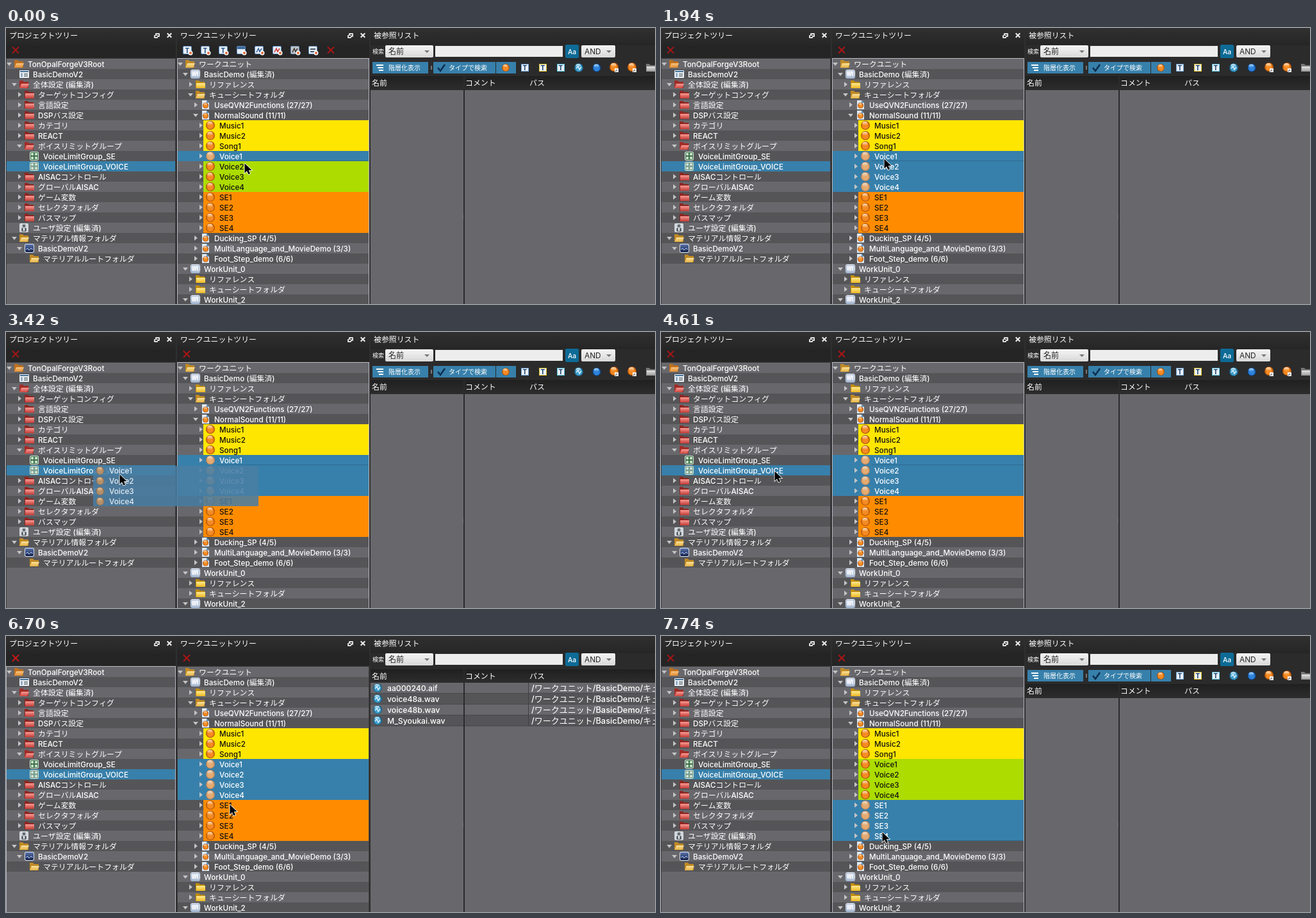
Write an HTML page with a canvas that moves like this. It is 1013 px wide and 431 px high and loops after 8 s.

```html
<!DOCTYPE html>
<html lang="ja">
<head>
<meta charset="utf-8">
<style>
html, body { margin: 0; width: 100%; height: 100%; overflow: hidden; background: #2b2b2c; }
canvas { display: block; }
</style>
</head>
<body>
<canvas id="stage" width="1013" height="431"></canvas>
<script>
const c = document.getElementById('stage').getContext('2d');
const BLUE = '#3780ab', ROW = '#68686c', ALT = '#555558', BAR = '#2b2b2c';
const YELLOW = '#ffe600', GREEN = '#addc00', ORANGE = '#ff8c00';
const LOOP = 8000;

// depth, icon, label, arrow (v open, > closed)
const project = [
  [0, 'root', 'TonOpalForgeV3Root', 'v'], [1, 'list', 'BasicDemoV2'],
  [1, 'redOpen', '全体設定 (編集済)', 'v'],
  ...['ターゲットコンフィグ', '言語設定', 'DSPバス設定', 'カテゴリ', 'REACT'].map(s => [2, 'red', s, '>']),
  [2, 'redOpen', 'ボイスリミットグループ', 'v'],
  [3, 'group', 'VoiceLimitGroup_SE'], [3, 'group', 'VoiceLimitGroup_VOICE'],
  ...['AISACコントロール', 'グローバルAISAC', 'ゲーム変数', 'セレクタフォルダ', 'バスマップ'].map(s => [2, 'red', s, '>']),
  [1, 'user', 'ユーザ設定 (編集済)'], [1, 'open', 'マテリアル情報フォルダ', 'v'],
  [2, 'wave', 'BasicDemoV2', 'v'], [3, 'open', 'マテリアルルートフォルダ']
];
const cue = (name, color) => [4, 'ball', name, '>', color];
const work = [
  [0, 'open', 'ワークユニット', 'v'], [1, 'unit', 'BasicDemo (編集済)', 'v'],
  [2, 'folder', 'リファレンス', '>'], [2, 'open', 'キューシートフォルダ', 'v'],
  [3, 'sheet', 'UseQVN2Functions (27/27)', '>'], [3, 'sheet', 'NormalSound (11/11)', 'v'],
  ...['Music1', 'Music2', 'Song1'].map(s => cue(s, YELLOW)),
  ...[1, 2, 3, 4].map(n => cue('Voice' + n, GREEN)),
  ...[1, 2, 3, 4].map(n => cue('SE' + n, ORANGE)),
  [3, 'sheet', 'Ducking_SP (4/5)', '>'], [3, 'sheet', 'MultiLanguage_and_MovieDemo (3/3)', '>'],
  [3, 'sheet', 'Foot_Step_demo (6/6)', '>'], [1, 'unit', 'WorkUnit_0', 'v'],
  [2, 'folder', 'リファレンス', '>'], [2, 'folder', 'キューシートフォルダ', '>'], [1, 'unit', 'WorkUnit_2', 'v']
];

// pointer: time, x, y, optional offset of the dragged list
const pointer = [
  [0, 372, 211], [150, 371, 216], [290, 368, 236], [440, 367, 248],
  [1040, 362, 236], [1190, 350, 212], [1340, 348, 204],
  [2380, 347, 205], [2530, 318, 213], [2680, 263, 226], [2830, 224, 230, -37, -12],
  [2980, 199, 229], [3120, 185, 225], [3270, 178, 222], [3420, 177, 222],
  [3570, 176, 220], [3720, 176, 218], [3860, 177, 217], [4010, 177, 217],
  [6110, 208, 238], [6260, 322, 308], [6400, 381, 323], [6550, 362, 288], [6700, 349, 263],
  [7150, 349, 267], [7290, 348, 284], [7440, 346, 299], [7590, 345, 306]
];

function box(x, y, w, h, fill) { c.fillStyle = fill; c.fillRect(x, y, w, h); }
function frame(x, y, w, h, color) { c.strokeStyle = color; c.lineWidth = 1; c.strokeRect(x + .5, y + .5, w - 1, h - 1); }
function round(x, y, w, h, r, fill) { c.fillStyle = fill; c.beginPath(); c.roundRect(x, y, w, h, r); c.fill(); }
function poly(fill, ...p) {
  c.fillStyle = fill;
  c.beginPath();
  for (let i = 0; i < p.length; i += 2) c.lineTo(p[i], p[i + 1]);
  c.closePath();
  c.fill();
}
function line(color, width, ...p) {
  c.strokeStyle = color;
  c.lineWidth = width;
  c.beginPath();
  for (let i = 0; i < p.length; i += 2) c.lineTo(p[i], p[i + 1]);
  c.stroke();
}
function oval(x, y, rx, ry, fill) {
  c.fillStyle = fill;
  c.beginPath();
  c.ellipse(x, y, rx, ry, 0, 0, 7);
  c.fill();
}
function grad(y, h, top, bottom) {
  const g = c.createLinearGradient(0, y, 0, y + h);
  g.addColorStop(0, top);
  g.addColorStop(1, bottom);
  return g;
}
function text(s, x, y, color = '#fff', size = 11.9, weight = 500) {
  c.fillStyle = color;
  for (const run of s.match(/[ -~]+|[^ -~]+/g)) {
    c.font = /[ -~]/.test(run)
      ? `${weight} ${size * .985}px Inter, sans-serif`
      : `${weight} ${size}px "Noto Sans CJK JP", "Noto Sans CJK", sans-serif`;
    c.fillText(run, x, y);
    x += c.measureText(run).width;
  }
}
function cross(x, y, r, color, width) {
  line(color, width, x - r, y - r, x + r, y + r);
  line(color, width, x + r, y - r, x - r, y + r);
}
function ball(x, y, r, light, mid, dark) {
  const g = c.createRadialGradient(x, y + r * .35, 0, x, y, r);
  g.addColorStop(0, mid);
  g.addColorStop(.6, mid);
  g.addColorStop(1, dark);
  oval(x, y, r, r, g);
  oval(x - r * .1, y - r * .42, r * .6, r * .42, grad(y - r, r, light, mid));
}
const cueBall = (x, y, r = 7) => ball(x, y, r, '#fff0d8', '#f58a22', '#a34a08');
const waveBall = (x, y) => {
  ball(x, y, 7, '#e4f7ff', '#3f9fce', '#14506f');
  line('#e8f8ff', 1.3, x - 4, y + 1, x - 1, y - 2, x + 1, y + 3, x + 4, y - 1);
};
function folder(x, y, light, base, dark, open) {
  poly(dark, x - 7, y - 6, x - 2, y - 6, x, y - 4, x + 7, y - 4, x + 7, y + 6, x - 7, y + 6);
  const f = grad(y - 3, 9, light, base);
  if (open) poly(f, x - 4, y - 1, x + 8, y - 1, x + 5, y + 6, x - 7, y + 6);
  else box(x - 6, y - 2, 14, 8, f);
}
function typeIcon(x, y, fill) {
  round(x - 6, y - 6, 12, 12, 1, '#e9f0f6');
  frame(x - 6, y - 6, 12, 12, fill);
  text('T', x - 3.5, y + 4, '#183a68', 10, 700);
}
const icons = {
  root: (x, y) => folder(x, y, '#ffd9a0', '#e08a2c', '#c0701c', true),
  open: (x, y) => folder(x, y, '#fff0b8', '#e5b040', '#c08a24', true),
  folder: (x, y) => folder(x, y, '#fff0a0', '#eeb820', '#c08c10'),
  red: (x, y) => folder(x, y, '#ffa8a0', '#c23a35', '#8e2522'),
  redOpen: (x, y) => folder(x, y, '#ffb5ac', '#d04540', '#a02c28', true),
  ball: (x, y) => cueBall(x, y),
  list(x, y) {
    round(x - 7, y - 6, 15, 12, 1, '#eef2f6');
    box(x - 6, y - 5, 13, 2, '#44749f');
    for (const d of [-1, 1, 3]) { box(x - 5, y + d, 3, 1, '#35689a'); box(x, y + d, 6, 1, '#566'); }
  },
  group(x, y) {
    round(x - 7, y - 7, 14, 14, 3, '#d5e8d7');
    round(x - 6, y - 6, 12, 12, 2, '#4a7955');
    for (const a of [-3, 3]) for (const b of [-3, 3]) oval(x + a, y + b, 2, 2, '#d8f0d8');
  },
  user(x, y) {
    round(x - 7, y - 7, 14, 14, 2, '#d3d8de');
    oval(x, y - 3, 2.5, 2.5, '#666d75');
    round(x - 4, y, 8, 6, 2, '#62686f');
    box(x - 1, y, 2, 5, '#eee');
  },
  wave(x, y) {
    round(x - 7, y - 7, 15, 14, 3, '#d6dfed');
    round(x - 6, y - 6, 13, 12, 2, grad(y - 6, 12, '#5a74ad', '#101d45'));
    line('#bcd5ff', 1, x - 5, y + 2, x - 2, y, x, y + 3, x + 3, y, x + 6, y + 2);
  },
  unit(x, y) {
    round(x - 7, y - 7, 15, 14, 3, grad(y - 7, 14, '#f4f7fc', '#a9bbd4'));
    text('WU', x - 5.5, y + 3, '#fff', 8, 700);
    frame(x - 6, y - 6, 13, 12, '#9db0cb');
  },
  sheet(x, y) {
    poly('#dfeaf4', x - 5, y - 7, x + 2, y - 7, x + 6, y - 3, x + 6, y + 7, x - 5, y + 7);
    poly('#5b93c4', x + 2, y - 7, x + 6, y - 3, x + 2, y - 3);
    cueBall(x + .5, y + 1, 4.5);
  }
};

function row(x0, y, [depth, icon, label, arrow, color], selected) {
  const x = x0 + 8 * depth;
  if (arrow === 'v') poly('#c4c4c6', x + 1, y - 2, x + 9, y - 2, x + 5, y + 3);
  if (arrow === '>') poly('#c4c4c6', x + 3, y - 4, x + 8, y, x + 3, y + 4);
  icons[icon](x + 20, y);
  if (selected) oval(x + 20, y, 7, 7, 'rgba(205,220,232,.4)');
  text(label, x + 34, y + 4.5, color && !selected ? '#111' : '#fff');
}
function tree(x, w, rows, selected, focusRow, active) {
  box(x, 47, w, 384, ROW);
  rows.forEach((r, i) => {
    const y = 48 + 16 * i, on = selected(i);
    box(x, y, w, 16, on ? BLUE : i % 2 ? ALT : ROW);
    if (r[4] && !on) box(x + 41, y, w - 41, 16, r[4]);
    if (i === focusRow) box(x + 62, y + 15, w - 62, 1, '#2c6c92');
    row(x, y + 8, r, on);
  });
  frame(x, 47, w, 390, active ? '#b9b9c3' : '#3c3c3f');
}
function header(x, w, title, buttons) {
  box(x, 0, w, 27, grad(0, 27, '#303031', '#262627'));
  box(x, 27, w, 20, '#232324');
  for (let i = 28; i < 47; i += 3) box(x, i, w, 1, '#282829');
  text(title, x + 5, 16);
  if (!buttons) return;
  const r = x + w;
  round(r - 32, 8, 7, 6, 1, '#ddd');
  box(r - 30, 10, 3, 2, BAR);
  round(r - 34, 11, 6, 5, 1, '#ddd');
  box(r - 32, 12, 3, 2, BAR);
  cross(r - 10, 11.5, 3.3, '#eee', 2);
}
function newIcons() {
  for (let i = 0; i < 8; i++) {
    const x = 283 + 28 * i, y = 35;
    round(x - 7, y - 7, 14, 13, 2, '#5f8fc0');
    round(x - 6, y - 6, 12, 11, 1, i === 6 ? '#c4c4c4' : '#e6eef8');
    if (i < 3) text('T', x - 3.5, y + 4, '#1d4778', 10, 700);
    else if (i === 3) box(x - 6, y - 6, 12, 4, '#416b9c');
    else if (i === 7) { box(x - 4, y - 3, 8, 2, '#456'); box(x - 4, y + 1, 8, 2, '#456'); }
    else line(['#315f98', '#c33', '#333'][i - 4], 1.5, x - 4, y + 3, x - 1, y - 3, x + 1, y + 2, x + 4, y - 3);
    oval(x + 5, y + 4, 3.5, 3.5, '#fff');
    oval(x + 5, y + 4, 2, 2, '#e06a3a');
  }
}
function combo(x, w, label) {
  round(x, 27, w, 19, 2, grad(27, 19, '#f4f4f4', '#d9d9d9'));
  text(label, x + 5, 41, '#222', 12, 400);
  poly('#777', x + w - 14, 35, x + w - 6, 35, x + w - 10, 39);
}
function columns(y, h) {
  box(569, y, 444, h, grad(y, h, '#202021', '#2d2d2e'));
  const base = y + h / 2 + 4;
  text('名前', 571, base);
  text('コメント', 717, base);
  text('パス', 817, base);
  box(714, y, 2, 431 - y, BAR);
}
function filters() {
  box(572, 53, 87, 18, BLUE);
  for (const d of [0, 4, 8]) box(578 + d / 2, 57 + d, 11 - d / 2, 2, '#fff');
  text('階層化表示', 597, 66, '#fff', 10);
  box(663, 59, 2, 6, '#777');
  box(667, 53, 97, 18, BLUE);
  line('#0c2c4c', 2.5, 674, 62, 678, 67, 685, 57);
  text('タイプで検索', 691, 66, '#fff', 10);
  box(765, 53, 31, 18, BLUE);
  cueBall(780, 62, 6);
  ['#6fa3d8', '#e2c52c', '#58c6df'].forEach((f, i) => typeIcon(810 + 28 * i, 62, f));
  waveBall(894, 62);
  ball(922, 62, 6.5, '#cfeaff', '#2c83dc', '#073c84');
  for (const x of [949, 977]) {
    cueBall(x, 61, 7);
    box(x + 1, 63, 6, 6, '#f4f4f4');
    line('#222', 1, x + 2, 68, x + 5, 65);
  }
  folder(1006, 62, '#eee', '#999', '#777');
}
function references(listed) {
  header(569, 444, '被参照リスト');
  box(569, 27, 444, 48, BAR);
  text('検索', 572, 40, '#fff', 9);
  combo(592, 75, '名前');
  box(670, 28, 199, 17, '#ededed');
  round(873, 26, 21, 21, 2, '#0d6b96');
  text('Aa', 877, 40.5, '#fff', 10.5);
  combo(898, 53, 'AND');
  box(569, listed ? 70 : 97, 444, 400, ROW);
  if (listed) {
    columns(52, 21);
    ['aa000240.aif', 'voice48a.wav', 'voice48b.wav', 'M_Syoukai.wav'].forEach((name, i) => {
      const y = 73 + 17 * i;
      box(569, y, 444, 17, i % 2 ? ALT : ROW);
      box(569, y + 16, 444, 1, '#48484b');
      box(714, y, 2, 17, BAR);
      box(815, y, 1, 17, '#404043');
      waveBall(580, y + 8);
      text(name, 595, y + 12.5, '#fff', 12.4);
      text('/ワークユニット/BasicDemo/キューシートフォルダ', 820, y + 12.5, '#fff', 13);
    });
  } else {
    filters();
    columns(75, 22);
  }
  for (const y of [291, 294, 297]) box(713, y, 1, 1, '#999');
}
function dragged(x, y) {
  c.globalAlpha = .87;
  box(x, y, 258, 63, '#497ea4');
  c.globalAlpha = .85;
  for (let i = 0; i < 4; i++) {
    ball(x + 11, y + 7.5 + 16 * i, 6.5, '#ecd7b8', '#c49465', '#896846');
    text('Voice' + (i + 1), x + 25, y + 12 + 16 * i);
  }
  c.globalAlpha = 1;
}
function arrow(x, y) {
  const p = [[0, 0], [0, 15], [3.5, 11.8], [6, 17], [8.6, 15.8], [6.2, 10.8], [11, 10.6]].flatMap(([a, b]) => [x + a, y + b]);
  line('#fff', 1.6, ...p, x, y);
  poly('#000', ...p);
}

function draw(t) {
  const p = pointer.findLast(k => k[0] <= t);
  const projectActive = t >= 5060 && t < 7000;
  const single = t < 740 || (t >= 7000 && t < 7740);
  const [first, last] = t < 740 ? [9, 9] : t < 7000 ? [9, 12] : t < 7740 ? [13, 13] : [13, 16];
  const focus = t < 740 ? 9 : t < 1940 ? 12 : t < 5060 ? 9 : t < 7000 ? -1 : last;
  box(0, 0, 1013, 431, '#2f2f30');
  header(0, 265, 'プロジェクトツリー', true);
  header(267, 300, 'ワークユニットツリー', true);
  references(t >= 5210 && t < 7000);
  tree(0, 265, project, i => i === 10, -1, projectActive);
  tree(267, 300, work, i => i >= first && i <= last, focus, !projectActive);
  cross(15, 34.5, 5, projectActive ? '#d01818' : '#a91515', 1.8);
  if (single) newIcons();
  cross(single ? 507 : 282, 34.5, 5, '#b31414', 1.8);
  if (t >= 3570 && t < 4610) frame(34, 208, 230, 16, '#1e4d6b');
  if (t >= 2380 && t < 4610) dragged(p[1] + (p[3] ?? -41), p[2] + (p[4] ?? -13));
  arrow(p[1] + .5, p[2] + .5);
}
function tick() {
  draw(performance.now() % LOOP);
  requestAnimationFrame(tick);
}
tick();
</script>
</body>
</html>
```
